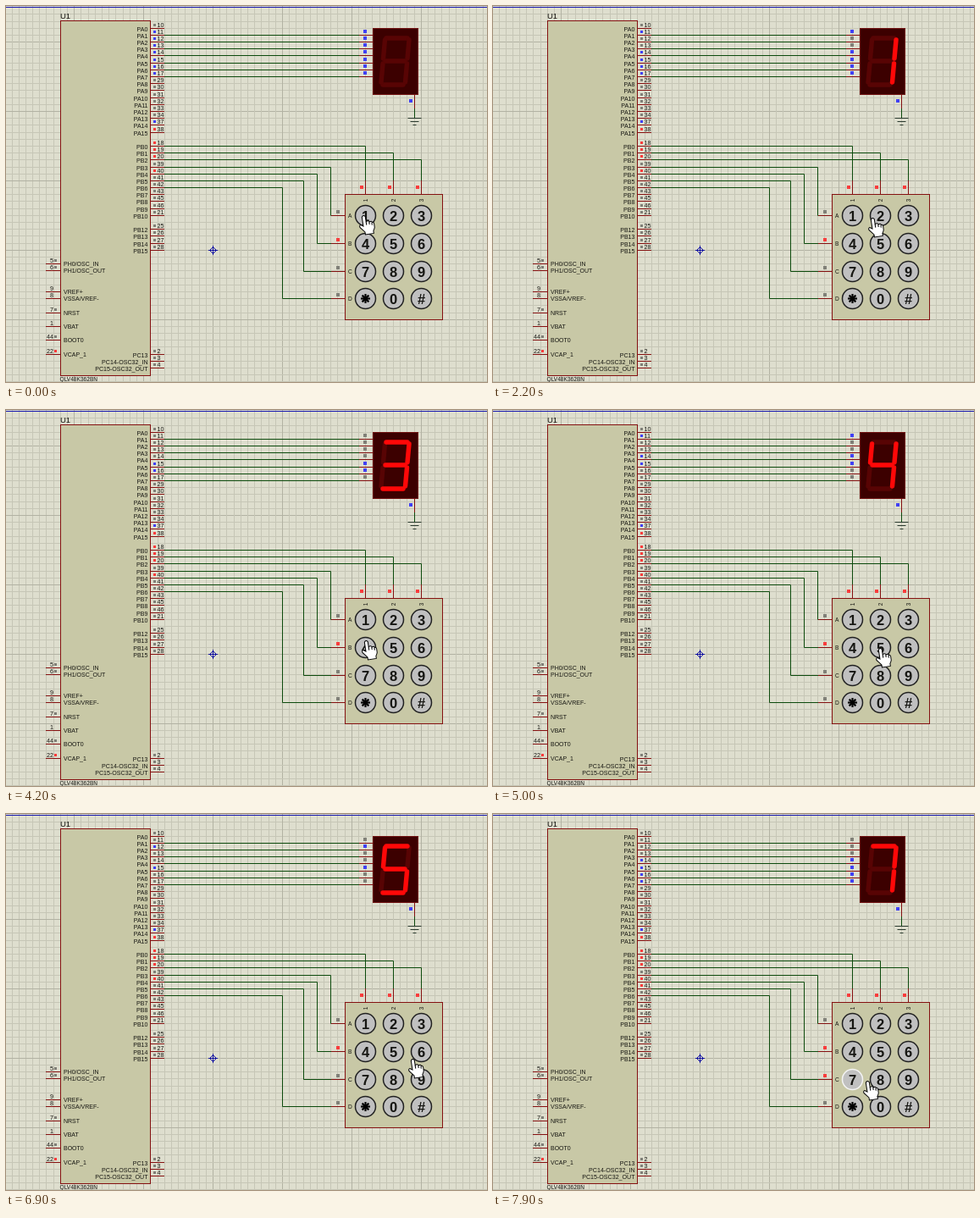
An HTML page with a canvas for the animation above (8000 ms loop, 568 by 444 pixels).

```html
<!DOCTYPE html>
<html>
<head>
<meta charset="utf-8">
<style>
html, body { margin: 0; width: 100%; height: 100%; overflow: hidden; background: #dedece; }
canvas { display: block; }
</style>
</head>
<body>
<canvas id="stage" width="568" height="444"></canvas>
<script>
const ctx = document.getElementById('stage').getContext('2d');
const FONT = '"Liberation Sans", Arial, sans-serif';
const PITCH = 8.19, LOOP = 8000;
const BROWN = '#841010', GREEN = '#0c4a0c', BODY = '#c8c8a6', INK = '#161612';
const GRAY = '#808078', BLUE = '#4040f4', RED = '#f83c3c';

const rowY = r => Math.floor(26.22 + r * PITCH) + 0.5;
const KEY_X = [424.5, 457.5, 490.5], KEY_Y = [247.5, 280.5, 313.5, 345.5];
const KEYS = '123456789*0#';

// Segments lit by each key, and [time, key] of each press
const SHAPES = { 1: 'BC', 2: 'ABDEG', 3: 'ABCDG', 4: 'BCFG', 5: 'ACDFG', 6: 'ACDFG', 7: 'ABC' };
const PRESSES = [[1000, 1], [2600, 2], [3500, 3], [4600, 4], [5200, 5], [6200, 6], [7700, 7]];
const HOLD = 300;

// Pointer: time, x, y of the fingertip
const PATH = [
  [0, 422, 247], [1900, 422, 247], [2200, 448, 250], [2400, 455, 250], [3000, 456, 250],
  [3200, 472, 250], [3400, 487, 250], [3700, 487, 250], [4200, 425, 272], [4700, 425, 272],
  [5000, 457, 281], [5300, 457, 281], [5800, 500, 281], [6500, 500, 281], [6900, 480, 289],
  [7300, 426, 313], [7700, 426, 313], [7900, 442, 315], [8000, 448, 315]
];

// First row, pin numbers, port, index of the first pin
const RIGHT_PINS = [
  [0, '10 11 12 13 14 15 16 17 29 30 31 32 33 34 37 38', 'PA', 0],
  [17, '18 19 20 39 40 41 42 43 45 46 21', 'PB', 0],
  [29, '25 26 27 28', 'PB', 12]
];
// Row, number, name, indicator
const LEFT_PINS = [
  [34, 5, 'PH0/OSC_IN', GRAY], [35, 6, 'PH1/OSC_OUT', GRAY], [38, 9, 'VREF+'], [39, 8, 'VSSA/VREF-'],
  [41, 7, 'NRST', GRAY], [43, 1, 'VBAT'], [45, 44, 'BOOT0', GRAY], [47, 22, 'VCAP_1', RED]
];
const PORT_C = [[47, 2, 'PC13'], [48, 3, 'PC14-OSC32_IN'], [49, 4, 'PC15-OSC32_OUT']];

function line(color, ...p) {
  ctx.strokeStyle = color;
  ctx.beginPath();
  for (let i = 0; i < p.length; i += 2) ctx.lineTo(p[i], p[i + 1]);
  ctx.stroke();
}

function text(s, x, y, size, align = 'left', weight = '') {
  ctx.font = `${weight} ${size}px ${FONT}`;
  ctx.textAlign = align;
  ctx.fillStyle = INK;
  ctx.fillText(s, x, y);
}

function box(x, y, w, h, fill, edge) {
  ctx.fillStyle = fill;
  ctx.fillRect(x, y, w, h);
  ctx.strokeStyle = edge;
  ctx.strokeRect(x, y, w, h);
}

function dot(x, y, color, size = 4) {
  ctx.fillStyle = color;
  ctx.fillRect(x, y, size, size);
}

function drawGrid() {
  ctx.fillStyle = '#dedece';
  ctx.fillRect(0, 0, 568, 444);
  for (let i = -36; i < 42; i++) {
    const color = i % 10 ? '#c6c6b6' : '#b2b2a3';
    const x = Math.floor(244.55 + i * PITCH) + 0.5, y = rowY(32 + i);
    line(color, x, 0, x, 444);
    line(color, 0, y, 568, y);
  }
  line('#1818b0', 0, 1.5, 568, 1.5);
  line('#1010a0', 240.5, 288.5, 244.5, 284.5, 248.5, 288.5, 244.5, 292.5, 240.5, 288.5);
  line('#1010a0', 239, 288.5, 250, 288.5);
  line('#1010a0', 244.5, 283, 244.5, 294);
}

function rightPin(row, num, name, color) {
  const y = rowY(row);
  line(BROWN, 171, y, 187, y);
  dot(174, y - 5.5, color, 3);
  text(num, 178.5, y - 1.5, 7.2);
  text(name, 167.5, y + 3, 7.1, 'right');
}

function drawChip(lit, pressedRow) {
  box(64.5, 17.5, 106, 419, BODY, BROWN);
  text('U1', 64, 15, 9.5);
  text('QLV48K362BN', 63.5, 443, 6.6);

  const state = {};
  for (let i = 0; i < 7; i++) state['PA' + (i + 1)] = lit.includes('ABCDEFG'[i]) ? GRAY : BLUE;
  state.PA14 = BLUE;
  for (const n of ['PA15', 'PB0', 'PB1', 'PB2', 'PB4']) state[n] = RED;
  if (pressedRow >= 0) state['PB' + (3 + pressedRow)] = RED;

  for (const [row, nums, port, first] of RIGHT_PINS)
    nums.split(' ').forEach((num, i) => {
      const name = port + (first + i);
      rightPin(row + i, num, name, state[name] || GRAY);
    });
  for (const [row, num, name] of PORT_C) rightPin(row, num, name, GRAY);

  for (const [row, num, name, color] of LEFT_PINS) {
    const y = rowY(row);
    line(BROWN, 47, y, 64, y);
    if (color) dot(57, y - 5.5, color, 3);
    text(num, 56, y - 1.5, 7.2, 'right');
    text(name, 68, y + 2.5, 7);
  }
}

function drawWires() {
  for (let r = 1; r < 8; r++) {
    line(GREEN, 187, rowY(r), 417, rowY(r));
    line(BROWN, 417, rowY(r), 433, rowY(r));
  }
  KEY_X.forEach((x, i) => {
    line(GREEN, 187, rowY(17 + i), x, rowY(17 + i), x, 206);
    line(BROWN, x, 206, x, 222);
  });
  [383.5, 367.5, 351.5, 326.5].forEach((x, i) => {
    const y = KEY_Y[i];
    line(GREEN, 187, rowY(20 + i), x, rowY(20 + i), x, y, 384, y);
    line(BROWN, 384, y, 400, y);
  });
  line(BROWN, 482.5, 104, 482.5, 121);
  line(GREEN, 482.5, 121, 482.5, 132);
  [8, 5, 2].forEach((w, i) => line('#28382c', 482.5 - w, 132.5 + 4 * i, 482.5 + w, 132.5 + 4 * i));
  dot(476, 110, BLUE);
}

function drawDisplay(lit) {
  box(433.5, 26.5, 53, 78, '#3c0000', '#701010');
  const segs = {
    A: [449, 38, 474, 38], B: [476, 40, 474, 62], C: [473.5, 68, 471.5, 90], D: [445, 93, 469, 93],
    E: [445, 68, 443, 90], F: [447.5, 40, 445.5, 62], G: [448, 65, 471, 65]
  };
  ctx.lineWidth = 5.4;
  ctx.lineCap = 'round';
  for (const pass of [false, true])
    for (const s in segs)
      if (lit.includes(s) === pass) line(pass ? '#ff0808' : '#580404', ...segs[s]);
  ctx.lineWidth = 1;
  ctx.lineCap = 'butt';
  for (let i = 0; i < 7; i++)
    dot(422, rowY(i + 1) - 6.5, lit.includes('ABCDEFG'[i]) ? GRAY : BLUE);
}

function drawKeypad(pressed, pressedRow) {
  box(400.5, 222.5, 115, 148, BODY, BROWN);
  KEY_X.forEach((x, i) => {
    dot(x - 6.5, 212, RED);
    ctx.save();
    ctx.translate(x + 2, 229.5);
    ctx.rotate(-Math.PI / 2);
    text(i + 1, 0, 0, 6.5, 'center');
    ctx.restore();
  });
  KEY_Y.forEach((y, i) => {
    dot(390, y - 6.5, i === 1 || i === pressedRow ? RED : GRAY);
    text('ABCD'[i], 404, y + 2.5, 6.6);
  });
  [...KEYS].forEach((key, i) => {
    const x = KEY_X[i % 3], y = KEY_Y[Math.floor(i / 3)];
    ctx.beginPath();
    ctx.arc(x, y, 12, 0, 7);
    ctx.fillStyle = '#c0c0c0';
    ctx.fill();
    ctx.lineWidth = 1.5;
    ctx.strokeStyle = i + 1 === pressed ? '#f4f4f4' : '#202020';
    ctx.stroke();
    if (key === '*') {
      ctx.lineWidth = 2.2;
      for (let a = 0; a < 4; a++) {
        const dx = 5.5 * Math.cos(a * Math.PI / 4), dy = 5.5 * Math.sin(a * Math.PI / 4);
        line('#000', x - dx, y - dy, x + dx, y + dy);
      }
    } else text(key, x, y + 6, 16.5, 'center', 'bold');
    ctx.lineWidth = 1;
  });
}

const HAND = new Path2D('M-2 2Q0-1 2 2V8Q5 6.5 6 9Q8.5 7.5 9 10Q11 9.5 11 12V16Q10.5 18 9 20V23H-1V20L-6 14Q-7 11-4.5 11L-2 13Z');
const KNUCKLES = new Path2D('M2 8V12M5.5 9V12M8.5 10V13');

function drawPointer(t) {
  const i = PATH.findIndex(p => p[0] > t);
  const [t0, x0, y0] = PATH[i - 1], [t1, x1, y1] = PATH[i];
  const k = (t - t0) / (t1 - t0);
  ctx.save();
  ctx.translate(x0 + (x1 - x0) * k, y0 + (y1 - y0) * k);
  ctx.rotate(-0.15);
  ctx.fillStyle = '#fff';
  ctx.strokeStyle = '#000';
  ctx.fill(HAND);
  ctx.stroke(HAND);
  ctx.stroke(KNUCKLES);
  ctx.restore();
}

function frame() {
  // The screen updates ten times a second
  const t = Math.floor(performance.now() % LOOP / 100) * 100;
  const last = PRESSES.filter(p => p[0] <= t).pop();
  const lit = last ? SHAPES[last[1]] : '';
  const pressed = last && t < last[0] + HOLD ? last[1] : 0;
  const pressedRow = pressed ? Math.floor((pressed - 1) / 3) : -1;

  drawGrid();
  drawWires();
  drawChip(lit, pressedRow);
  drawDisplay(lit);
  drawKeypad(pressed, pressedRow);
  drawPointer(t);
  requestAnimationFrame(frame);
}
frame();
</script>
</body>
</html>
```
